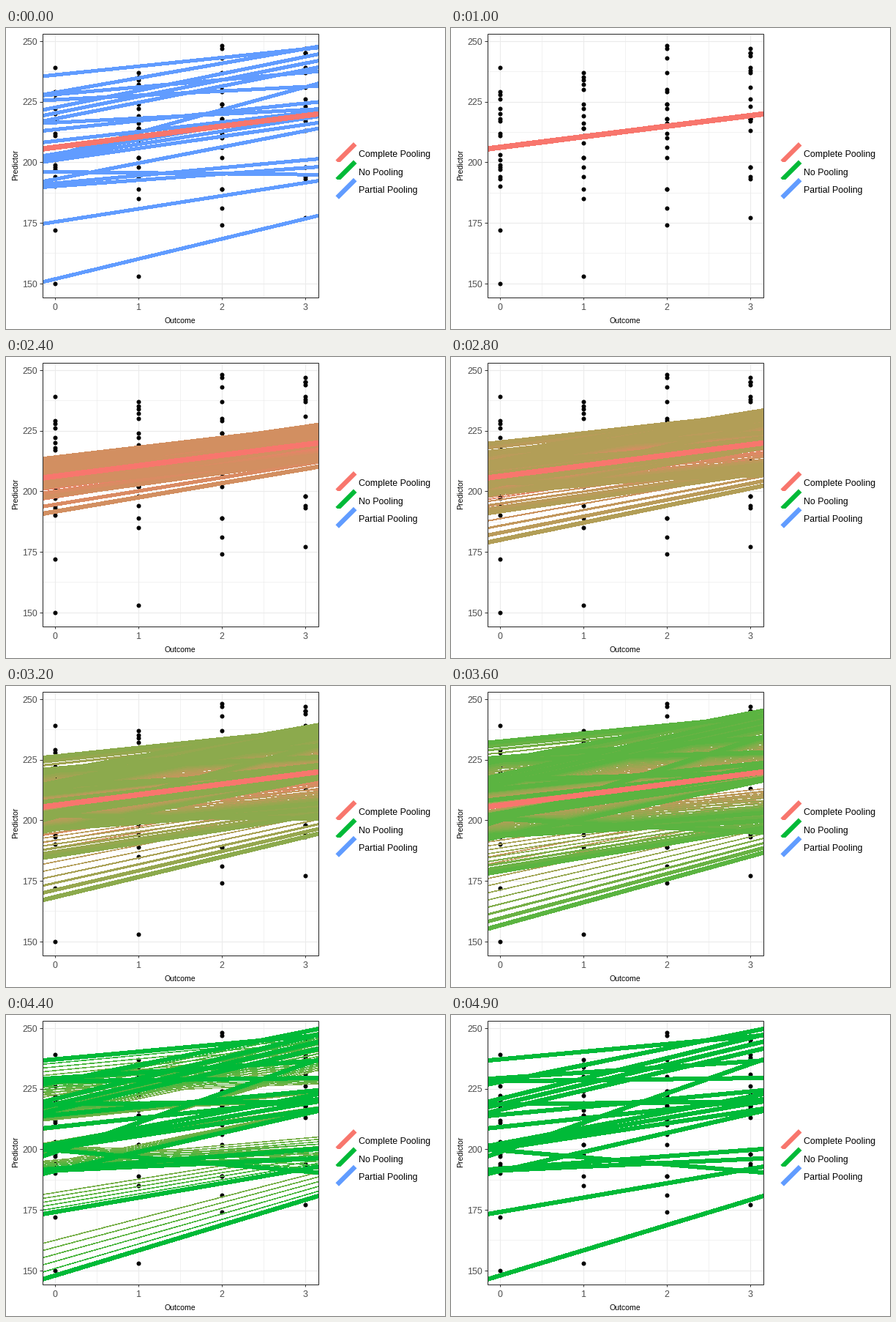
These frames come from a looping animation (600x411 px, 6000 ms). A matplotlib script:

```python
import numpy as np
import matplotlib.pyplot as plt
from matplotlib.animation import FuncAnimation
from matplotlib.collections import LineCollection
from matplotlib.colors import to_rgb
from matplotlib.patches import Rectangle

W, H, DPI = 600, 411, 96
FRAMES, INTERVAL = 60, 100
MOVE_START, MOVE_STEPS, WAKE = 20, 20, 10
LEFT, RIGHT, TOP, BOTTOM = 49.5, 426.5, 7.5, 367.5
X_MIN, X_MAX = -0.15, 3.15
LINE = 6.4
RED, GREEN, BLUE = "#F8766D", "#00BA38", "#619CFF"
FONT = "Liberation Sans"
PT = 72 / DPI


def fan(first, last, n):
    """n lines spread evenly between two, each (left value, right value)."""
    return np.linspace(first, last, n)


# Fitted lines, as values at the panel's left and right edge
COMPLETE = np.array([205.5, 219.9])
NO_POOL = np.vstack([
    [(146.3, 180.7), (173.2, 192.8), (236.6, 247), (229, 236.6),
     (226.7, 249.6), (228, 229.4), (218.5, 219.7), (213.7, 224.3),
     (208.6, 220.6), (197, 237), (189.8, 215.8), (200, 190.4)],
    fan((219.5, 247.2), (215, 241.5), 3),
    fan((201.3, 222.7), (199.5, 216.7), 3),
    fan((191.6, 200.1), (191, 196.2), 2),
])


def shrink(fits, mean, level=0.985, slope=0.65):
    """Pull each line's level and slope towards the mean line."""
    off = fits - mean
    mid = off.mean(axis=1, keepdims=True)
    return mean + level * mid + slope * (off - mid)


PARTIAL = shrink(NO_POOL, COMPLETE)


def observations():
    """Four points per line; the residuals leave its fit unchanged."""
    x = np.arange(4)
    t = (x - X_MIN) / (X_MAX - X_MIN)
    fit = NO_POOL[:, :1] + (NO_POOL[:, 1:] - NO_POOL[:, :1]) * t
    sign = (-1.0) ** np.arange(len(NO_POOL))
    residual = 1.7 * np.outer(sign, [1, -3, 3, -1])
    return np.tile(x, len(NO_POOL)), np.round(fit + residual).ravel()


# sRGB <-> CIE Lab, for the colour change along the way
TO_XYZ = np.array([[0.4124, 0.3576, 0.1805],
                   [0.2126, 0.7152, 0.0722],
                   [0.0193, 0.1192, 0.9505]])
WHITE = TO_XYZ.sum(axis=1)


def to_lab(color):
    c = np.array(to_rgb(color))
    lin = np.where(c > 0.04045, ((c + 0.055) / 1.055) ** 2.4, c / 12.92)
    f = np.cbrt(TO_XYZ @ lin / WHITE)
    return np.array([116 * f[1] - 16, 500 * (f[0] - f[1]),
                     200 * (f[1] - f[2])])


def from_lab(lab):
    fy = (lab[0] + 16) / 116
    f = np.array([fy + lab[1] / 500, fy, fy - lab[2] / 200])
    lin = np.clip(np.linalg.inv(TO_XYZ) @ (f ** 3 * WHITE), 0, 1)
    return np.where(lin > 0.0031308, 1.055 * lin ** (1 / 2.4) - 0.055,
                    12.92 * lin)


LAB_RED, LAB_GREEN = to_lab(RED), to_lab(GREEN)


def px(x):
    return 66.8 + 114.2 * x


def py(y):
    return 17.8 + (250 - y) * 3.31


def progress(n):
    return min(max((n - MOVE_START + 1) / MOVE_STEPS, 0), 1)


def state(n):
    """Edge values and colour of the fitted lines at step n."""
    if n < 0:
        return PARTIAL, to_rgb(BLUE)
    p = progress(n)
    ends = COMPLETE + p * (NO_POOL - COMPLETE)
    return ends, tuple(from_lab(LAB_RED + p * (LAB_GREEN - LAB_RED)))


def wake_width(age):
    # Aliased strokes cover about one pixel more than their width
    return max(0.5, round(LINE * (1 - age / WAKE) ** 3) - 1)


def segments(ends):
    """Lines through the edge values, run past the panel on both sides."""
    over, span = 0.05, RIGHT - LEFT
    return [((LEFT - over * span, py(a - over * (b - a))),
             (RIGHT + over * span, py(b + over * (b - a))))
            for a, b in ends]


fig = plt.figure(figsize=(W / DPI, H / DPI), dpi=DPI, facecolor="white")
ax = fig.add_axes([0, 0, 1, 1])
ax.set_xlim(0, W)
ax.set_ylim(H, 0)
ax.axis("off")


def stroke(x, y, color, width, z=1):
    ax.plot(x, y, color=color, lw=width * PT, zorder=z,
            solid_capstyle="butt")


def label(x, y, s, size, color="black", **kw):
    style = dict(ha="center", va="center_baseline") | kw
    ax.text(x, y, s, fontsize=size * PT, color=color, family=FONT, **style)


# Grid, ticks and axis labels
for i in range(7):
    stroke([px(i / 2)] * 2, [TOP, BOTTOM], "#EBEBEB", 0.6 if i % 2 else 1.1)
for i in range(9):
    y = py(150 + 12.5 * i)
    stroke([LEFT, RIGHT], [y, y], "#EBEBEB", 0.6 if i % 2 else 1.1)
for v in range(4):
    stroke([px(v)] * 2, [BOTTOM, BOTTOM + 3.5], "#333333", 1)
    label(px(v), 380.7, str(v), 12.4, "#4D4D4D")
for v in range(150, 251, 25):
    stroke([LEFT - 3.5, LEFT], [py(v)] * 2, "#333333", 1)
    label(43, py(v) + 0.4, str(v), 12.4, "#4D4D4D", ha="right")
label(237.7, 399, "Outcome", 10.5)
label(13.5, 187, "Predictor", 10.5, va="center", rotation=90)

xs, ys = observations()
ax.plot(px(xs), py(ys), "o", color="black", ms=6 * PT, mew=0, zorder=2)

# Legend: each key's white ground covers the end of the key above it
KEY_TOP, KEY_H = 158.3, 24.4
names = ("Complete Pooling", "No Pooling", "Partial Pooling")
for i, (name, color) in enumerate(zip(names, (RED, GREEN, BLUE))):
    y = KEY_TOP + KEY_H * i
    ax.add_patch(Rectangle((448, y), 33, KEY_H, color="white", lw=0,
                           zorder=3 + i))
    stroke([452.7, 477.2], [y + KEY_H, y], color, LINE, 3.5 + i)
    label(482.5, y + KEY_H / 2 + 1.3, name, 12.4, ha="left")

# Moving lines, clipped to the panel
panel = Rectangle((LEFT, TOP), RIGHT - LEFT, BOTTOM - TOP, fill=False,
                  ec="#333333", lw=1.1 * PT, zorder=10)
ax.add_patch(panel)


def line_layer(segs, z, **kw):
    layer = LineCollection(segs, zorder=z, antialiaseds=False,
                           capstyle="butt", **kw)
    ax.add_collection(layer, autolim=False)
    layer.set_clip_path(panel)
    return layer


fits = line_layer([], 5)
pooled = line_layer(segments([COMPLETE]), 6, colors=RED,
                    linewidths=LINE * PT)


def update(n):
    segs, colors, widths = [], [], []
    for age in range(WAKE, -1, -1):
        ends, color = state(n - age)
        segs += segments(ends)
        colors += [color] * len(ends)
        widths += [wake_width(age) * PT] * len(ends)
    fits.set_segments(segs)
    fits.set_color(colors)
    fits.set_linewidth(widths)
    pooled.set_visible(progress(n) < 1)
    return fits, pooled


anim = FuncAnimation(fig, update, frames=FRAMES, interval=INTERVAL,
                     repeat=True, repeat_delay=0, blit=False)
plt.show()
```
